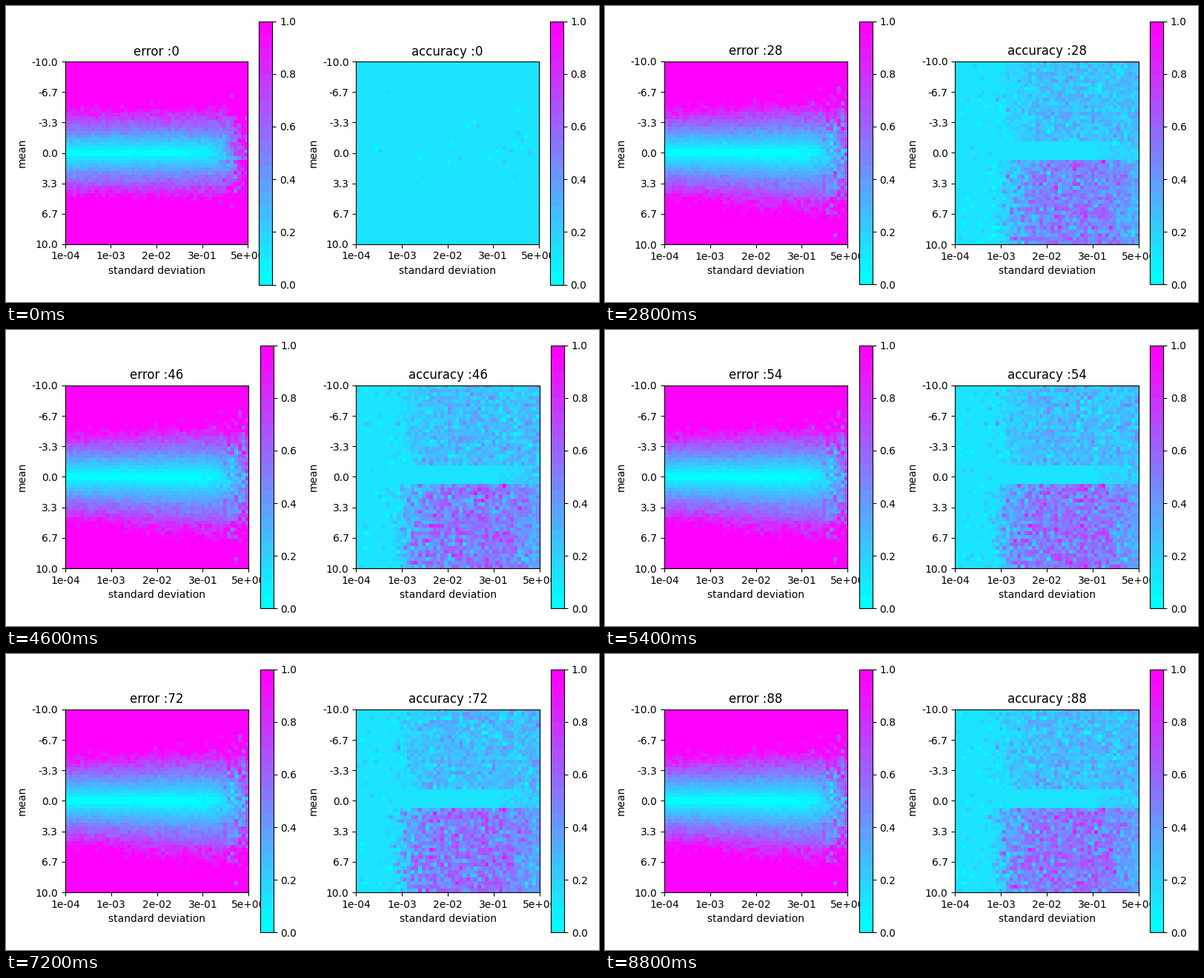
A matplotlib script for the animation above (8.9 s loop, 800x400 px).

```python
import numpy as np
import matplotlib.pyplot as plt
from matplotlib.animation import FuncAnimation

N, FRAMES = 50, 89
STEP = 8  # frames between two noise fields

rng = np.random.default_rng(7)
err_noise = rng.standard_normal((2, N, N))
acc_noise = rng.standard_normal((N, N))
edge_noise = rng.standard_normal((N, N))
drift = rng.standard_normal((FRAMES // STEP + 2, N, N))

mean = np.linspace(-10, 10, N)[:, None]
col = np.arange(N)[None, :]
std = np.geomspace(1e-4, 5, N)[None, :]


def sigmoid(x):
    return 1 / (1 + np.exp(-x))


def error_map(t):
    g = 1 - np.exp(-t / 5)
    size = 0.19 * np.hypot(mean, (1 - 0.25 * g) * std)
    relief = np.where(mean > 0, 0.36, 0.14) * g * sigmoid((col - 20) / 6)
    noise = np.sqrt(1 - g) * err_noise[0] + np.sqrt(g) * err_noise[1]
    edge = 0.14 * sigmoid((col - 44) / 1.5)
    return np.clip(size / (1 + relief) * (1 + 0.08 * noise) + edge * noise, 0, 1)


def accuracy_map(t):
    g = 1 - np.exp(-t / 12)
    k, part = divmod(t, STEP)
    a = part / STEP
    moving = ((1 - a) * drift[k] + a * drift[k + 1]) / np.hypot(a, 1 - a)
    z = 0.75 * acc_noise + 0.66 * moving

    start = 14 + 12 * np.exp(-t / 18)
    on = g * sigmoid((col - start + 2.5 * edge_noise) / 1.8)
    fade = 1 - 0.4 * sigmoid((col - 44) / 1.5)
    low = on * fade * (0.42 + 0.15 * z)
    high = on * (0.15 + 0.09 * z)
    mid = g * sigmoid((col - 41) / 2) * (0.1 + 0.06 * z)
    rise = np.where(mean > 0.8, low, np.where(mean < -1.1, high, mid))

    limit = 1.8 + 0.25 * np.abs(mean) * np.exp(-t / 8)
    reach = (col < start) | (t == 0)
    specks = 0.1 * np.sign(z) * (np.abs(z) > limit) * (1 - on) * reach
    return np.clip(0.12 + rise + specks, 0, 1)


fig, axes = plt.subplots(1, 2, figsize=(8, 4), dpi=100)


def panel(ax):
    im = ax.imshow(np.zeros((N, N)), cmap=plt.get_cmap("cool", 20),
                   vmin=0, vmax=1, extent=(0, N, N, 0), interpolation="nearest")
    ax.set_xticks(np.linspace(0, N, 5),
                  ["1e-04", "1e-03", "2e-02", "3e-01", "5e+00"])
    ax.set_yticks(np.linspace(0, N, 7),
                  [f"{v:.1f}" for v in np.linspace(-10, 10, 7).round(1) + 0.0])
    ax.set_xlabel("standard deviation")
    ax.set_ylabel("mean")
    ax.set_title(" ")
    fig.colorbar(im, ax=ax, ticks=np.linspace(0, 1, 6))
    return im


def tighten():
    fig.tight_layout()
    p = fig.subplotpars
    return dict(left=p.left, right=p.right, bottom=p.bottom, top=p.top,
                wspace=p.wspace, hspace=p.hspace)


err_im, acc_im = [panel(ax) for ax in axes]
# The layout settles on its second pass.
first, settled = tighten(), tighten()


def draw(t):
    fig.subplots_adjust(**(settled if t else first))
    err_im.set_data(error_map(t))
    acc_im.set_data(accuracy_map(t))
    axes[0].set_title(f"error :{t}")
    axes[1].set_title(f"accuracy :{t}")
    return err_im, acc_im


anim = FuncAnimation(fig, draw, frames=FRAMES, interval=100,
                     init_func=lambda: draw(0), repeat=True, repeat_delay=0)
plt.show()
```
